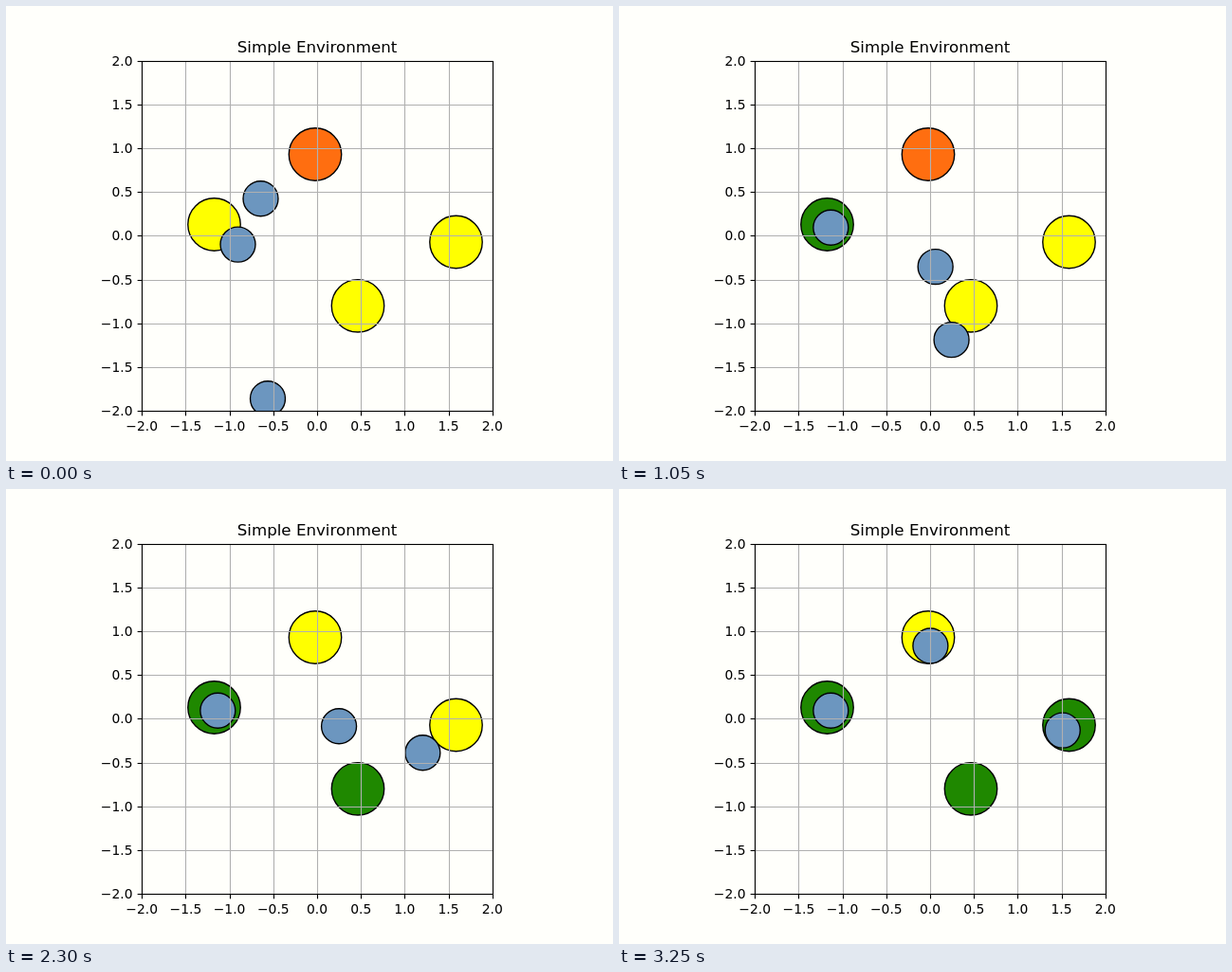
Animation, 640 px wide and 480 px high, one loop 3300 ms. Source, as an HTML page with a canvas:

```html
<!DOCTYPE html>
<html lang="en">
<head>
<meta charset="utf-8">
<title>Simple Environment</title>
<style>
  html, body { margin: 0; width: 640px; height: 480px; overflow: hidden; background: #fffffb; }
  canvas, svg { position: absolute; left: 0; top: 0; display: block; }
  text { font-family: "DejaVu Sans", sans-serif; font-size: 13.89px; fill: #000; }
  .title { font-size: 16.67px; }
</style>
</head>
<body>
<canvas id="plot" width="640" height="480"></canvas>
<svg id="labels" width="640" height="480">
  <text class="title" x="328" y="49" text-anchor="middle">Simple Environment</text>
</svg>
<script>
const ctx = document.getElementById('plot').getContext('2d');
const labels = document.getElementById('labels');

const FRAME = 50, FRAMES = 66;
const UNIT = 92.4, LEFT = 143.2, TOP = 57.6;
const STEP = 0.05 * UNIT, REACH = 0.1 * UNIT;
const YELLOW = '#ffff00', GREEN = '#1f8800', ORANGE = '#ff6e10', BLUE = '#6c96bf';

const west = { x: 219.5, y: 230.5 };
const south = { x: 371, y: 316.3 };
const east = { x: 474.5, y: 249 };
const north = { x: 326, y: 156.5 };

// Straight walk at constant speed, ending once the goal is within reach
function leg(from, goal, start) {
  const dx = goal.x - from.x, dy = goal.y - from.y, d = Math.hypot(dx, dy);
  const steps = Math.ceil((d - REACH) / STEP);
  const at = f => {
    const s = Math.max(0, Math.min(steps, f - start)) * STEP / d;
    return { x: from.x + dx * s, y: from.y + dy * s };
  };
  return { at, end: start + steps };
}

const walkA = leg({ x: 244.5, y: 251.6 }, west, 0);
const walkB = leg({ x: 268.5, y: 203.2 }, south, 0);
const walkC = leg({ x: 276, y: 414.2 }, east, 0);
const walkB2 = leg(walkB.at(walkB.end), north, walkB.end);

const snap = v => Math.floor(v + 0.5) + 0.5;
const ticks = Array.from({ length: 9 }, (_, i) => ({
  x: LEFT + i * UNIT / 2,
  y: TOP + i * UNIT / 2,
  value: i / 2 - 2
}));

function addLabel(x, y, anchor, value) {
  const t = document.createElementNS('http://www.w3.org/2000/svg', 'text');
  t.setAttribute('x', x);
  t.setAttribute('y', y);
  t.setAttribute('text-anchor', anchor);
  t.textContent = value.toFixed(1).replace('-', '\u2212');
  labels.appendChild(t);
}
for (const { x, y, value } of ticks) {
  addLabel(x, 448, 'middle', value);
  addLabel(133.5, Math.round(y) + 5, 'end', -value);
}

function line(x1, y1, x2, y2) {
  ctx.beginPath();
  ctx.moveTo(x1, y1);
  ctx.lineTo(x2, y2);
  ctx.stroke();
}

function disc({ x, y }, r, fill) {
  ctx.beginPath();
  ctx.arc(x, y, r * UNIT, 0, Math.PI * 2);
  ctx.fillStyle = fill;
  ctx.fill();
  ctx.stroke();
}

function draw(f) {
  const x0 = snap(LEFT), y0 = snap(TOP), size = 4 * UNIT;
  const x1 = snap(LEFT + size), y1 = snap(TOP + size);
  ctx.fillStyle = '#fffffb';
  ctx.fillRect(0, 0, 640, 480);

  ctx.save();
  ctx.beginPath();
  ctx.rect(x0, y0, x1 - x0, y1 - y0);
  ctx.clip();
  ctx.strokeStyle = '#000';
  ctx.lineWidth = 1.39;
  disc(west, 0.3, f >= walkA.end ? GREEN : YELLOW);
  disc(south, 0.3, f >= walkB.end ? GREEN : YELLOW);
  disc(east, 0.3, f >= walkC.end ? GREEN : YELLOW);
  disc(north, 0.3, f >= walkB2.end ? GREEN : f >= walkB.end ? YELLOW : ORANGE);
  disc(walkA.at(f), 0.2, BLUE);
  disc((f < walkB.end ? walkB : walkB2).at(f), 0.2, BLUE);
  disc(walkC.at(f), 0.2, BLUE);

  ctx.lineWidth = 1.11;
  ctx.strokeStyle = '#b0b0b0';
  for (const t of ticks) {
    line(snap(t.x), y0, snap(t.x), y1);
    line(x0, snap(t.y), x1, snap(t.y));
  }
  ctx.restore();

  ctx.lineWidth = 1.11;
  ctx.strokeStyle = '#000';
  for (const t of ticks) {
    line(snap(t.x), y1, snap(t.x), y1 + 4.86);
    line(x0 - 4.86, snap(t.y), x0, snap(t.y));
  }
  ctx.strokeRect(x0, y0, x1 - x0, y1 - y0);
}

function tick(now) {
  draw(Math.floor(now / FRAME) % FRAMES);
  requestAnimationFrame(tick);
}
draw(0);
requestAnimationFrame(tick);
</script>
</body>
</html>
```
